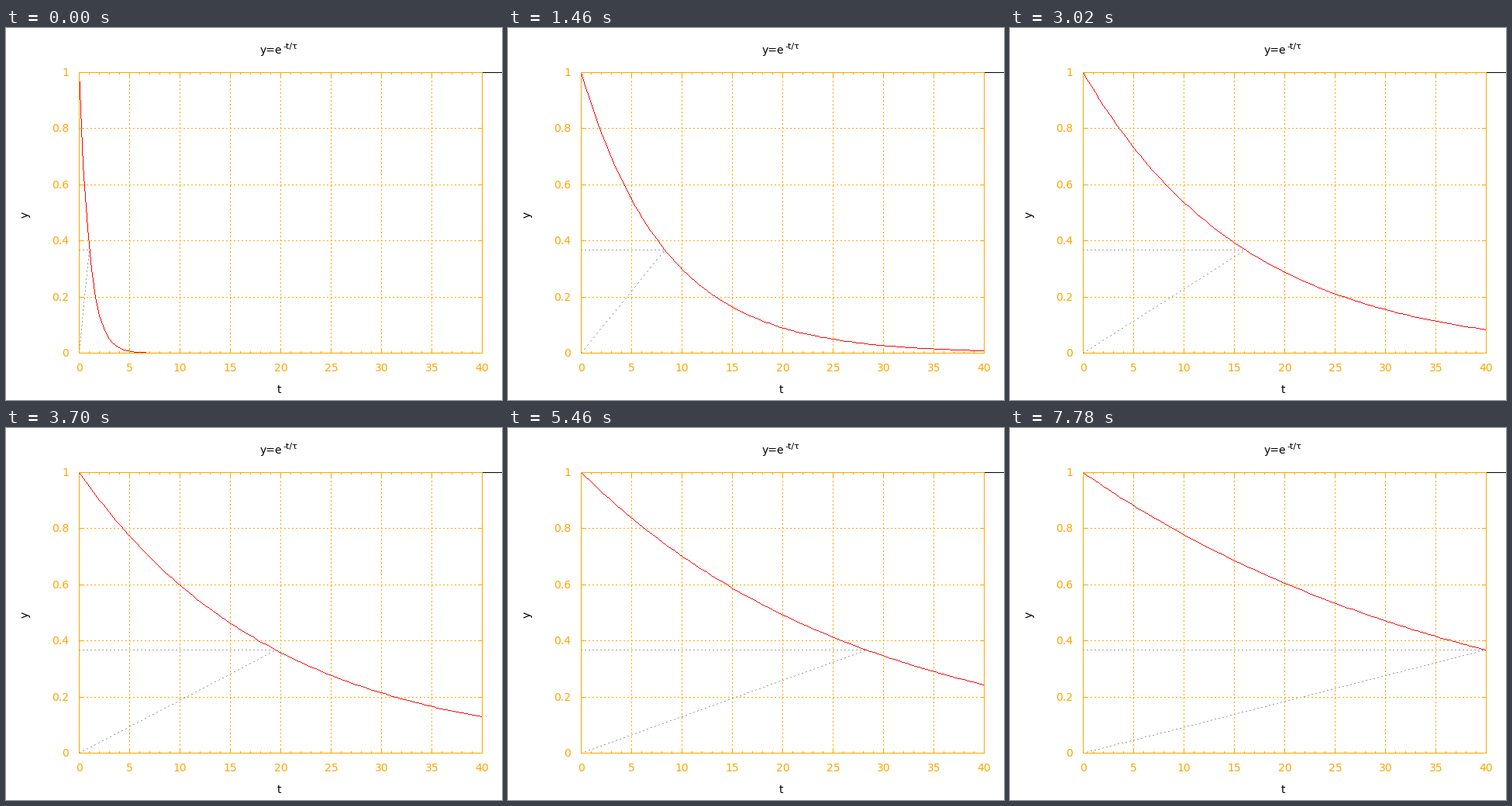
Animation of 640 by 480 pixels, one loop 7.8 s. Source, as a matplotlib script:

```python
import numpy as np
import matplotlib.pyplot as plt
from matplotlib.animation import FuncAnimation

W, H, DPI = 640, 480, 100
LEFT, RIGHT, TOP, BOTTOM = 94, 614, 57, 419
T_MAX, FRAMES, STEP_MS = 40, 390, 20
MAJOR, MINOR = 5, 2

WHITE, BLACK = (255, 255, 255), (0, 0, 0)
ORANGE, GRAY, RED = (255, 165, 0), (160, 160, 160), (255, 0, 0)


def px(t):
    return int(LEFT + t / T_MAX * (RIGHT - LEFT) + 0.5)


def py(y):
    return int(BOTTOM - y * (BOTTOM - TOP) + 0.5)


def trace(img, points, color, dotted=False):
    """Draw a crisp one-pixel polyline through pixel positions."""
    phase = 0
    for (x0, y0), (x1, y1) in zip(points, points[1:]):
        n = max(abs(x1 - x0), abs(y1 - y0))
        if n == 0:
            continue
        i = np.arange(n + 1)
        if dotted:
            i = i[(i + phase) % 5 < 2]
        xs = np.floor(x0 + (x1 - x0) * i / n + 0.5).astype(int)
        ys = np.floor(y0 + (y1 - y0) * i / n + 0.5).astype(int)
        img[ys, xs] = color
        phase += n


def draw_grid(img):
    for t in range(5, T_MAX, 5):
        trace(img, [(px(t), BOTTOM), (px(t), TOP)], ORANGE, dotted=True)
    for k in range(1, 5):
        trace(img, [(LEFT, py(k / 5)), (RIGHT, py(k / 5))], ORANGE, dotted=True)


def draw_border(img):
    for t in range(T_MAX + 1):
        size = MINOR if t % 5 else MAJOR
        img[TOP:TOP + size + 1, px(t)] = ORANGE
        img[BOTTOM - size:BOTTOM + 1, px(t)] = ORANGE
    for k in range(6):
        img[py(k / 5), LEFT:LEFT + MAJOR + 1] = ORANGE
        img[py(k / 5), RIGHT - MAJOR:RIGHT + 1] = ORANGE
    img[[TOP, BOTTOM], LEFT:RIGHT + 1] = ORANGE
    img[TOP:BOTTOM + 1, [LEFT, RIGHT]] = ORANGE
    img[TOP, RIGHT + 1:] = BLACK


base = np.full((H, W, 3), WHITE, dtype=np.uint8)
draw_grid(base)
samples = np.linspace(0, T_MAX, 100)


def render(frame):
    tau = 1 + frame / 10
    img = base.copy()
    knee = (px(tau), py(np.exp(-1)))
    trace(img, [(LEFT, BOTTOM), knee], GRAY, dotted=True)
    trace(img, [(LEFT, knee[1]), knee], GRAY, dotted=True)
    trace(img, [(px(t), py(np.exp(-t / tau))) for t in samples], RED)
    draw_border(img)
    return img


fig = plt.figure(figsize=(W / DPI, H / DPI), dpi=DPI, facecolor="white")
plot = fig.figimage(render(0))


def label(x, y, text, size=14, color="black", **kw):
    kw = {"ha": "center", "va": "baseline", **kw}
    fig.text(x / W, 1 - y / H, text, fontsize=size * 72 / DPI, color=color,
             family="DejaVu Sans", **kw)


label(327.5, 33, "y=e", ha="left")
label(357, 27, "-t/τ", size=11.2, ha="left")
label(352, 471, "t")
label(25, 241, "y", rotation=90, va="center")
for t in range(0, T_MAX + 1, 5):
    label(px(t) + 0.5, 443, str(t), color="orange")
for k in range(6):
    label(81, py(k / 5) + 5, f"{k / 5:g}", color="orange", ha="right")


def update(frame):
    plot.set_data(render(frame))
    return [plot]


anim = FuncAnimation(fig, update, frames=FRAMES, interval=STEP_MS, repeat=True,
                     repeat_delay=0, blit=False)
plt.show()
```
